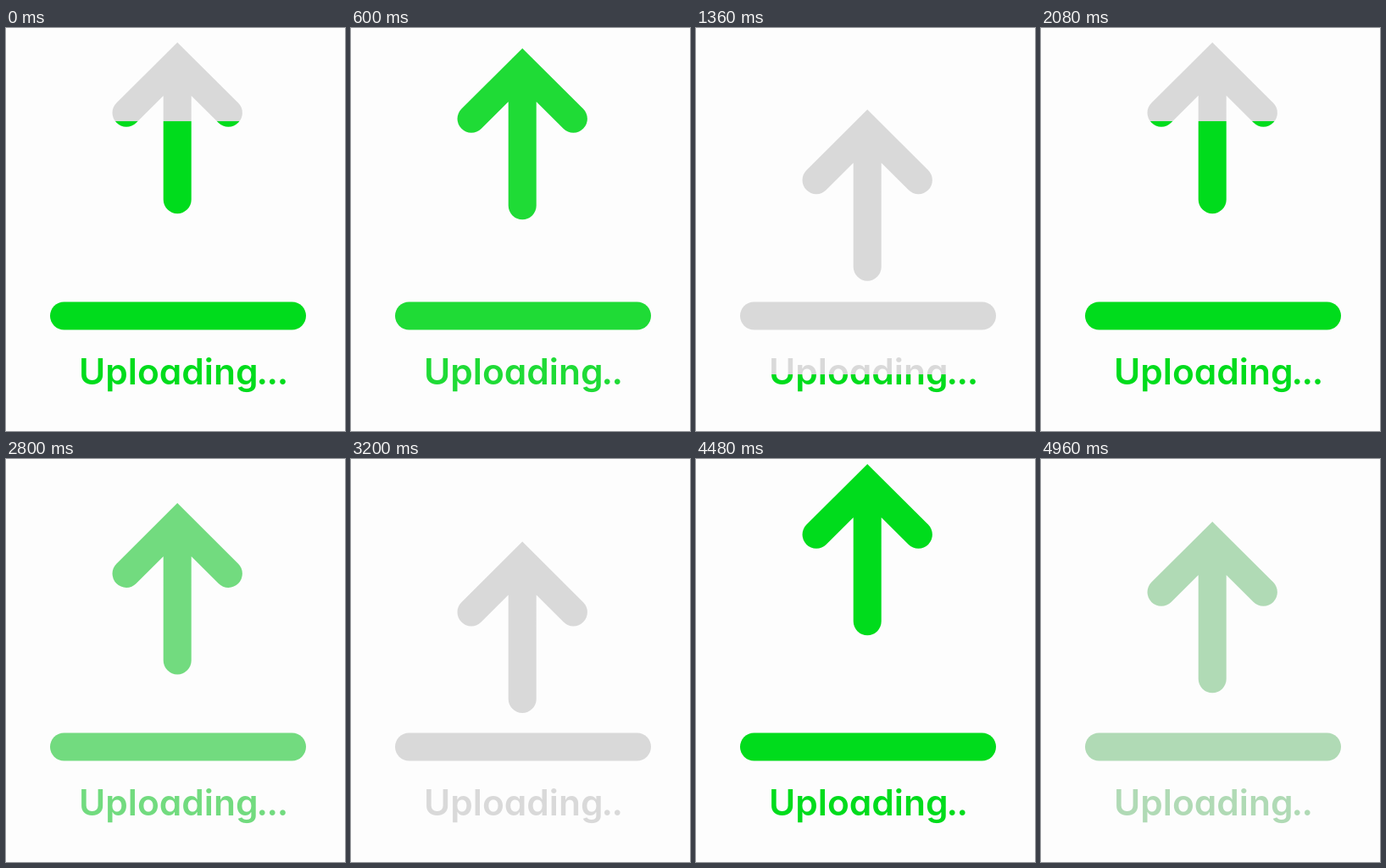
These frames come from a looping animation (400 by 476 pixels, 5000 ms). An HTML page without scripts:

```html
<!DOCTYPE html>
<html lang="en">
<head>
<meta charset="utf-8">
<title>Uploading</title>
<style>
  @property --time { syntax: "<number>"; inherits: true; initial-value: 0; }

  html, body { margin: 0; width: 100%; height: 100%; overflow: hidden; background: #fdfdfd; }

  /* all motion follows one clock in ms; the first stretch runs a little slower */
  svg {
    display: block; width: 400px; height: 476px;
    animation: clock 5s linear infinite;
    --cycle: mod(var(--time) - 1200, 2028);
    --typing: mod(var(--time) - 253, 640);
  }
  @keyframes clock {
    from { --time: 52; }
    12% { --time: 600; }
    to { --time: 5000; }
  }

  /* half a cosine up, half a cosine down, with short rests */
  .arrow {
    fill: none; stroke: #fff; stroke-width: 33; stroke-linecap: round;
    --up: clamp(0, (var(--cycle) - 80) / 1060, 1);
    --down: clamp(0, (var(--cycle) - 1168) / 850, 1);
    transform: translateY(calc(50px + 47px * cos(180deg * (var(--up) + var(--down)))));
  }
  /* the green level climbs steadily, then fades out */
  .level {
    fill: #00dc1c;
    transform: translateY(calc(476px * max(0, 1 - var(--cycle) / 1146)));
    opacity: clamp(0, (1818 - var(--cycle)) / 454, 1);
  }
  text { font: 600 42.5px Inter, sans-serif; font-feature-settings: "cv11"; fill: #fff; }
  .dots { letter-spacing: -1.5px; }
  .dot { fill-opacity: clamp(0, var(--typing) - 213 * var(--n), 1); }
</style>
</head>
<body>
<svg viewBox="0 0 400 476">
  <mask id="shapes" maskUnits="userSpaceOnUse" x="0" y="0" width="400" height="476">
    <path class="arrow" d="M142 84 L202.2 24 L262.4 84 M202.2 24 V186.5"/>
    <rect x="52" y="323.5" width="302" height="33" rx="16.5" fill="#fff"/>
    <text x="86" y="421">Uploading<tspan class="dots" dx="-2">.<tspan class="dot" style="--n: 1">.</tspan><tspan class="dot" style="--n: 2">.</tspan></tspan></text>
  </mask>
  <g mask="url(#shapes)">
    <rect width="400" height="476" fill="#d9d9d9"/>
    <rect class="level" width="400" height="476"/>
  </g>
</svg>
</body>
</html>
```
